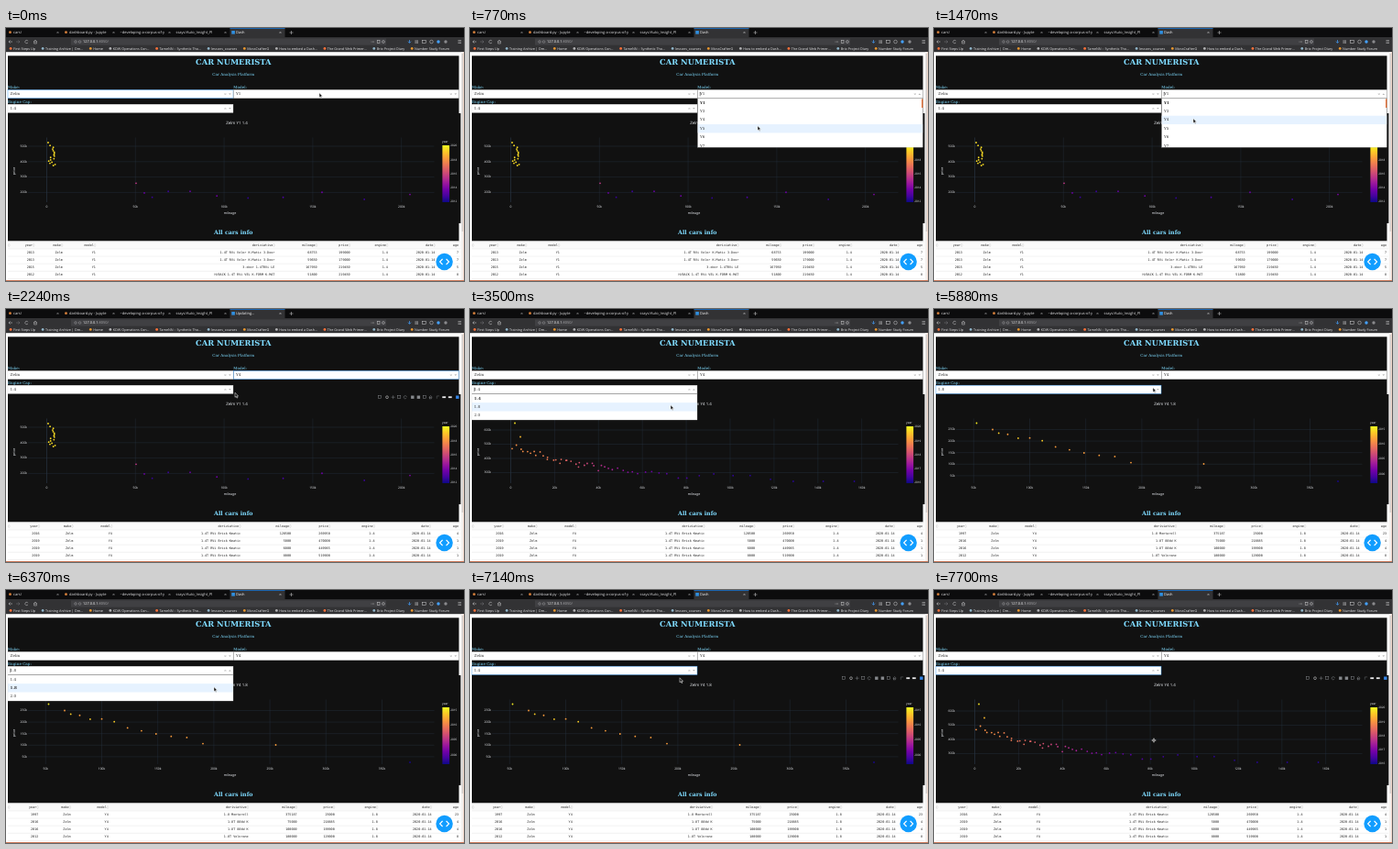
An HTML page with a canvas for the animation above (8000 ms loop, 500 px wide and 276 px high).

```html
<!DOCTYPE html>
<html lang="en">
<head>
<meta charset="utf-8">
<title>Car dashboard</title>
<style>
html, body { margin: 0; width: 100%; height: 100%; overflow: hidden; background: #fff; }
canvas { display: block; width: 500px; height: 276px; }
</style>
</head>
<body>
<canvas id="stage"></canvas>
<script>
const W = 500, H = 276, LOOP = 8000;
const canvas = document.getElementById('stage');
const scale = window.devicePixelRatio || 1;
canvas.width = W * scale;
canvas.height = H * scale;
const ctx = canvas.getContext('2d');

const SERIF = '"DejaVu Serif", serif', SANS = '"Open Sans", sans-serif';
const MONO = '"DejaVu Sans Mono", monospace';
const CYAN = '#7fdbff', DARK = '#111111', GRID = '#283442', PALE = '#f2f5fa', ICON = '#d0d0d2';
const PLASMA = ['#0d0887', '#46039f', '#7201a8', '#9c179e', '#bd3786',
  '#d8576b', '#ed7953', '#fb9f3a', '#fdca26', '#f0f921'];
const MAKE = 'Zelm';

// Drawing helpers
function rect(x, y, w, h, color) {
  ctx.fillStyle = color;
  ctx.fillRect(x, y, w, h);
}

function box(x, y, w, h, color, width = 0.5) {
  ctx.strokeStyle = color;
  ctx.lineWidth = width;
  ctx.strokeRect(x, y, w, h);
}

function line(points, color, width = 0.5) {
  ctx.beginPath();
  for (let i = 0; i < points.length; i += 2) ctx.lineTo(points[i], points[i + 1]);
  ctx.strokeStyle = color;
  ctx.lineWidth = width;
  ctx.stroke();
}

function chevron(x, y, dx, dy, color, width) {
  // Points along (dx, dy)
  line([x - dx - dy, y - dy - dx, x, y, x - dx + dy, y - dy + dx], color, width);
}

function dot(x, y, r, color) {
  ctx.beginPath();
  ctx.arc(x, y, r, 0, Math.PI * 2);
  ctx.fillStyle = color;
  ctx.fill();
}

function ring(x, y, r, color, from = 0, to = Math.PI * 2) {
  ctx.beginPath();
  ctx.arc(x, y, r, from, to);
  ctx.strokeStyle = color;
  ctx.lineWidth = 0.5;
  ctx.stroke();
}

function setFont(size, family, weight = '') {
  ctx.font = `${weight} ${size}px ${family}`;
}

function text(str, x, y, size, family, color, align = 'left', weight = '') {
  setFont(size, family, weight);
  ctx.textAlign = align;
  ctx.fillStyle = color;
  ctx.fillText(str, x, y);
}

function cross(x, y, r, color) {
  line([x - r, y - r, x + r, y + r], color, 0.45);
  line([x + r, y - r, x - r, y + r], color, 0.45);
}

function seeded(seed) {
  return () => {
    seed = (seed * 16807) % 2147483647;
    return seed / 2147483647;
  };
}

// Each point is [x, y, position on the colour scale]
function smallCars() {
  const rnd = seeded(41), pts = [[142, 169.3, 0.45]];
  for (let i = 0; i < 17; i++) {
    const u = i / 16;
    pts.push([46 + rnd() * (5 + 6 * u), 125 + 25 * u ** 0.75, 0.93]);
  }
  for (let i = 0; i < 10; i++) pts.push([151 + 290 * (i / 9) ** 1.6, 182 + (rnd() - 0.5) * 11, 0.06 + rnd() * 0.2]);
  return pts;
}

function midCars() {
  const rnd = seeded(7), pts = [[49, 124.5, 0.95], [55, 139.5, 0.85]];
  for (let i = 0; i < 50; i++) {
    const u = i / 49, x = 46 + 170 * u + 200 * u ** 8 + rnd() * 4;
    const y = 187 - 38 * Math.exp((46 - x) / 95) + (rnd() - 0.5) * 8;
    pts.push([x, Math.min(y, 188), 0.05 + 0.68 * Math.exp(-(((x - 46) / 125) ** 2))]);
  }
  return pts;
}

function largeCars() {
  const rnd = seeded(19), pts = [[46.5, 124.5, 0.97], [294.5, 169, 0.77], [441, 188, 0.02]];
  for (let i = 0; i < 12; i++) {
    const x = 64 + 151 * (i / 11) ** 1.3;
    pts.push([x, 134 + 0.21 * (x - 64) + (rnd() - 0.5) * 5, i % 2 && i < 6 ? 0.9 : 0.77]);
  }
  return pts;
}

// Axes: first tick position, spacing, first value, value step, count
const axis = (at, step, from, by, n) => ({ at, step, from, by, n });

const PLOTS = {
  small: {
    title: MAKE + ' Y1 1.4', points: smallCars(),
    xs: axis(44.5, 96.8, 0, 50, 5), ys: axis(129, 16.8, 500, -100, 4), bar: axis(128.5, 15.2, 2020, -2, 5)
  },
  mid: {
    title: MAKE + ' Y4 1.4', points: midCars(),
    xs: axis(44.5, 47.9, 0, 20, 9), ys: axis(132, 15.5, 600, -100, 4), bar: axis(128.5, 15.2, 2020, -1, 5)
  },
  large: {
    title: MAKE + ' Y4 1.8', points: largeCars(),
    xs: axis(43.3, 61.2, 50, 50, 7), ys: axis(131.5, 12.6, 250, -50, 5), bar: axis(131, 16.3, 2015, -5, 4)
  }
};

const HEADS = ['year', 'make', 'model', 'deriviative', 'mileage', 'price', 'engine', 'date', 'age'];

// chars: width of the longest derivative, which sets how the columns share the row
const TABLES = {
  small: { model: 'Y1', engine: '1.4', chars: 38, rows: [
    '2013|1.4T RVi Velor K-Matic 3-Door|68753|199000',
    '2013|1.4T RVi Velor K-Matic 3-Door|59650|179000',
    '2015|3-door 1.4TRVi LE|167950|219450',
    '2012|H/BACK 1.4T RVi VEL K-FORM K-MAT|51800|219450'] },
  mid: { model: 'Y4', engine: '1.4', chars: 23, rows: [
    '2016|1.4T RVi Brisk Kmatic|120500|269950',
    '2019|1.4T RVi Brisk Kmatic|5000|470000',
    '2019|1.4T RVi Brisk Kmatic|6000|449985',
    '2019|1.4T RVi Brisk Kmatic|8000|519900'] },
  large: { model: 'Y4', engine: '1.8', chars: 26, rows: [
    '1997|1.8 Montarell|375187|25000',
    '2016|1.8T 88kW K|75000|218885',
    '2016|1.8T 88kW K|100000|199900',
    '2012|1.8T Velorane|180000|129000'] }
};

const TABS = ['cars/', 'dashboard.py - Jupyte', '~developing-a-corpus-of-y', 'ssays/Auto_Insight_Pl'];
const BOOKMARKS = ['First Steps Up', 'Training Archive | Om…', 'Home', 'KDW Operations Con…',
  'TameNN – Synthetic Tho…', 'lessons_courses', 'MossCrafterG', 'How to embed a Dash…',
  'The Grand Web Primer…', 'Brio Project Diary', 'Number Study Forum'];
const BOOKMARK_DOTS = ['#ff7139', '#8fb4c8', '#e8962e', '#b1b1b3'];

// What the page does, and when
const EVENTS = [
  [0, { focus: 'make', menu: '', model: 'Y1', engine: '1.4', table: 'small', plot: 'small', updating: false }],
  [210, { focus: 'model', menu: 'model' }],
  [1680, { menu: '', model: 'Y4' }],
  [1750, { updating: true }],
  [1960, { table: 'mid' }],
  [2380, { plot: 'mid', updating: false }],
  [2660, { focus: 'engine', menu: 'engine' }],
  [3920, { menu: '', engine: '1.8' }],
  [3990, { updating: true }],
  [4060, { table: 'large' }],
  [4270, { plot: 'large', updating: false }],
  [5950, { menu: 'engine' }],
  [7140, { menu: '', engine: '1.4' }],
  [7210, { updating: true }],
  [7280, { table: 'mid' }],
  [7490, { plot: 'mid', updating: false }]
];

// Pointer moves: start, end, target x, y
const MOVES = [[420, 770, 315, 109], [770, 1470, 284, 101], [1680, 2240, 251, 93.5],
  [2240, 2520, 226, 89], [3010, 3500, 220, 107], [3920, 4340, 225, 117], [4550, 5180, 241, 140],
  [5530, 5880, 240, 88], [5950, 6300, 228, 108], [6370, 6860, 230, 98], [7140, 7700, 240, 164]];

function pointer(t) {
  let x = 343, y = 73;
  for (const [from, to, tx, ty] of MOVES) {
    const k = Math.min(1, Math.max(0, (t - from) / (to - from)));
    const ease = k * k * (3 - 2 * k);
    x += (tx - x) * ease;
    y += (ty - y) * ease;
  }
  return { x, y };
}

function stateAt(t) {
  const past = EVENTS.filter(([at]) => at <= t).map(([, change]) => change);
  return Object.assign(pointer(t), ...past);
}

function drawTabs(updating) {
  rect(0, 0, W, 10, '#0c0c0d');
  rect(0, 10, W, 16.2, '#323234');
  rect(244.5, 0, 60, 10, '#323234');
  rect(244.5, 0, 60, 0.6, '#0a84ff');
  TABS.forEach((name, i) => {
    const x = i * 61, shift = i < 2 ? 8 : 2.5;
    if (i < 2) dot(x + 4.5, 4.7, 1.4, '#d8813c');
    text(name, x + shift, 4.9, 4, SANS, '#e2e2e4');
    cross(x + 56.5, 4.9, 0.9, '#c8c8ca');
  });
  rect(246.3, 3, 3.6, 3.6, '#2f8fe0');
  text(updating ? 'Updating...' : 'Dash', 251, 4.9, 4, SANS, '#f9f9fa');
  cross(299.5, 4.9, 0.9, '#e2e2e4');
  line([309.5, 5, 313.5, 5], ICON);
  line([311.5, 3, 311.5, 7], ICON);
}

function drawToolbar() {
  const y = 15;
  line([3, y, 7, y], ICON);
  chevron(3, y, -1.6, 0, ICON);
  line([11, y, 15, y], '#77777a');
  chevron(15, y, 1.6, 0, '#77777a');
  ring(22.5, y, 1.7, ICON, 0.5, 5.8);
  chevron(32, y - 2, 0, -2, ICON);
  box(30.8, y, 2.4, 2, ICON);
  rect(71, 11.4, 344, 7.2, '#404043');
  ring(76, y, 1.3, '#a0a0a4');
  ring(80.6, y, 1.3, '#a0a0a4');
  text('127.0.0.1', 84, y + 0.1, 3.9, SANS, '#f9f9fa');
  text(':8050/', 84 + ctx.measureText('127.0.0.1').width, y + 0.1, 3.9, SANS, '#a8a8ab');
  for (let i = 0; i < 3; i++) {
    dot(399 + i * 1.4, y, 0.4, ICON);
    line([447 + i * 1.2, 13.2, 447 + i * 1.2, 17], ICON);
    line([493.5, 13.5 + i * 1.5, 497, 13.5 + i * 1.5], ICON);
  }
  box(405.2, 13.6, 2.8, 2.8, ICON);
  ring(412, y, 1.4, ICON);
  line([440.5, 13, 440.5, 16.3], '#45a1ff', 0.7);
  chevron(440.5, 16.3, 0, 1.6, '#45a1ff', 0.7);
  box(454.5, 13.3, 4, 3.4, ICON);
  ring(464.5, y, 1.8, ICON);
  dot(472, y, 1.7, '#45a1ff');
  dot(480, y, 1.7, '#8a8a8d');
}

function drawBookmarks() {
  setFont(3.75, SANS);
  const widths = BOOKMARKS.map(name => ctx.measureText(name).width);
  const gap = (476 - widths.reduce((a, b) => a + b)) / (widths.length - 1);
  let x = 8;
  BOOKMARKS.forEach((name, i) => {
    dot(x - 2.9, 22.4, 1.4, BOOKMARK_DOTS[i % BOOKMARK_DOTS.length]);
    text(name, x, 22.6, 3.75, SANS, '#e6e6e8');
    x += widths[i] + gap;
  });
}

function drawSelect(x, y, value, focused, open) {
  const w = 246, ax = x + w - 3.6, ay = y + 4.7, d = open ? -0.7 : 0.7;
  rect(x, y, w, 9.2, '#fff');
  box(x, y, w, 9.2, focused && !open ? '#4aa3f5' : '#cccccc', focused && !open ? 0.5 : 0.3);
  text(value, x + 2.6, ay, 4.17, SERIF, '#333');
  if (open) line([x + 2.8, y + 2.4, x + 2.8, y + 7], '#222');
  cross(x + w - 8.6, ay, 0.9, '#999');
  ctx.beginPath();
  ctx.moveTo(ax - 1.3, ay - d);
  ctx.lineTo(ax + 1.3, ay - d);
  ctx.lineTo(ax, ay + d);
  ctx.fillStyle = '#999';
  ctx.fill();
}

function drawMenu(x, y, h, options, current, py) {
  const w = 246, row = 9.35;
  const hover = py < y ? options.indexOf(current) : Math.floor((py - y) / row);
  ctx.save();
  ctx.beginPath();
  ctx.rect(x, y, w, h);
  ctx.clip();
  rect(x, y, w, h, '#fff');
  options.forEach((name, i) => {
    const top = y + i * row;
    if (i === hover) rect(x, top, w, row, '#e6f2ff');
    text(name, x + 2.6, top + row / 2, 4.17, SERIF, '#333', 'left', name === current ? 'bold' : '');
  });
  ctx.restore();
  box(x, y, w, h, '#cccccc', 0.3);
}

function drawHeader(s) {
  rect(2, 30.3, 492.5, 63.7, DARK);
  text('CAR NUMERISTA', 248.3, 38, 8.33, SERIF, CYAN, 'center', 'bold');
  text('Car Analysis Platform', 248.3, 50.7, 4.17, SERIF, CYAN, 'center');
  text('Make:', 2, 64.7, 4.17, SERIF, CYAN);
  text('Model:', 248.3, 64.7, 4.17, SERIF, CYAN);
  text('Engine Cap:', 2, 80.6, 4.17, SERIF, CYAN);
  drawSelect(2, 67.4, MAKE, s.focus === 'make', false);
  drawSelect(248.4, 67.4, s.model, s.focus === 'model', s.menu === 'model');
  drawSelect(2, 83.2, s.engine, s.focus === 'engine', s.menu === 'engine');
}

function ticks(a, draw) {
  for (let i = 0; i < a.n; i++) draw(a.at + a.step * i, a.from + a.by * i);
}

function plasma(t) {
  const p = t * (PLASMA.length - 1), i = Math.min(PLASMA.length - 2, Math.floor(p)), k = p - i;
  const part = (c, j) => parseInt(PLASMA[c].slice(1 + j * 2, 3 + j * 2), 16);
  const mix = [0, 1, 2].map(j => Math.round(part(i, j) * (1 - k) + part(i + 1, j) * k));
  return `rgb(${mix})`;
}

function drawPlot(p) {
  rect(2, 93, 494.5, 120, DARK);
  rect(2, 213, 492.5, 19.5, DARK);
  text(p.title, 252, 104.3, 4.43, SANS, PALE, 'center');
  ticks(p.xs, (x, v) => {
    line([x, 119.5, x, 190], GRID, v ? 0.4 : 0.7);
    text(v ? v + 'k' : '0', x, 195, 3.3, SANS, PALE, 'center');
  });
  ticks(p.ys, (y, v) => {
    line([24, y, 467.5, y], GRID, 0.4);
    text(v + 'k', 23, y, 3.3, SANS, PALE, 'right');
  });
  text('mileage', 244.5, 202.4, 3.7, SANS, PALE, 'center');
  ctx.save();
  ctx.translate(8.7, 156);
  ctx.rotate(-Math.PI / 2);
  text('price', 0, 0, 3.7, SANS, PALE, 'center');
  ctx.restore();
  for (const [x, y, t] of p.points) dot(x, y, 0.9, plasma(t));
  const fill = ctx.createLinearGradient(0, 190, 0, 128);
  PLASMA.forEach((c, i) => fill.addColorStop(i / (PLASMA.length - 1), c));
  rect(476.4, 128, 7.7, 62, fill);
  text('year', 476, 124.6, 3.3, SANS, PALE);
  ticks(p.bar, (y, v) => text(v, 485.2, y, 3.1, SANS, PALE));
}

// Modebar icons, in groups, each drawn around its centre
const frame = (x, y, c) => box(x - 1.6, y - 1.5, 3.2, 3, c);
const block = (x, y, c) => rect(x - 1.7, y - 1.7, 3.4, 3.4, c);
const lens = (x, y) => ring(x, y, 1.4, '#e8e8ea');
const loop = (x, y, c) => ring(x, y, 1.6, c, 0.8, 6.3);
const house = (x, y, c) => { chevron(x, y - 1.7, 0, -1.8, c); box(x - 1, y, 2, 1.7, c); };
const plus = (x, y, c) => { line([x - 2, y, x + 2, y], c); line([x, y - 2, x, y + 2], c); };
const label = (x, y) => rect(x - 1.9, y - 0.9, 3.8, 1.8, '#e8e8ea');
const mark = (x, y) => block(x, y, '#3585e8');
const MODEBAR = [[frame], [lens, plus, frame, loop], [block, block, frame, house],
  [chevronIcon, label, label], [mark]];

function chevronIcon(x, y, c) {
  line([x - 1.3, y + 1.6, x - 1.3, y - 1.3, x + 1.5, y - 1.3], c, 0.4);
}

function drawModebar() {
  let x = 408;
  for (const group of MODEBAR) {
    for (const icon of group) {
      icon(x, 96.2, '#85888c');
      x += 6.6;
    }
    x += 1.4;
  }
}

function sortIcon(x) {
  line([x - 0.8, 236.6, x, 235.6, x + 0.8, 236.6], '#888', 0.3);
  line([x - 0.8, 237.4, x, 238.4, x + 0.8, 237.4], '#888', 0.3);
}

function drawTable({ model, engine, chars, rows }) {
  text('All cars info', 248.3, 223.6, 6.25, SERIF, CYAN, 'center', 'bold');
  rect(2, 232.6, 494.5, 8.5, '#fafafa');
  for (let i = 0; i < 6; i++) line([2, 232.9 + i * 8.1, 496, 232.9 + i * 8.1], '#d3d3d3', 0.3);

  const widths = HEADS.map(h => h === 'deriviative' ? chars : Math.max(h.length + 2, h === 'date' ? 10 : 0));
  const unit = 494 / widths.reduce((a, b) => a + b);
  const cells = rows.map(row => {
    const [year, kind, miles, price] = row.split('|');
    return [year, MAKE, model, kind, miles, price, engine, '2020-01-14', 2020 - year];
  });
  let x = 0;
  sortIcon(3.2);
  HEADS.forEach((head, i) => {
    x += widths[i] * unit;
    const last = i === HEADS.length - 1;
    text(head, last ? x : x - 2, 237, 3.43, MONO, '#222', 'right');
    if (!last) sortIcon(x - 0.7);
    cells.forEach((row, j) => text(row[i], x, 245.1 + j * 8.05, 3.43, MONO, '#222', 'right'));
  });
}

function drawButton() {
  dot(478.6, 255, 9.2, '#119dff');
  chevron(473.6, 255, -3, 0, '#fff', 1.1);
  chevron(483.6, 255, 3, 0, '#fff', 1.1);
}

function drawPointer({ x, y, menu }) {
  if (!menu && y > 119.5 && y < 190) {
    for (const [color, w] of [['#fff', 1.3], ['#111', 0.5]]) {
      line([x - 2.2, y, x + 2.2, y], color, w);
      line([x, y - 2.2, x, y + 2.2], color, w);
    }
    return;
  }
  ctx.beginPath();
  [[0, 0], [0, 5], [1.2, 3.9], [2, 5.8], [2.9, 5.4], [2, 3.7], [3.6, 3.6]]
    .forEach(([dx, dy]) => ctx.lineTo(x - 1 + dx, y - 2.2 + dy));
  ctx.closePath();
  ctx.fillStyle = '#111';
  ctx.fill();
  ctx.strokeStyle = '#fff';
  ctx.lineWidth = 0.5;
  ctx.stroke();
}

function drawEdges() {
  rect(496.8, 26.2, 3.2, 249, '#f4f1ef');
  rect(497.6, 28, 1.6, 194, '#d4d0ce');
  rect(499.4, 26.2, 0.6, 249, '#f1c9b4');
  rect(0, 275.1, W, 0.9, '#c96f4c');
}

function render(t) {
  const s = stateAt(t);
  ctx.setTransform(scale, 0, 0, scale, 0, 0);
  ctx.textBaseline = 'middle';
  ctx.textRendering = 'geometricPrecision';
  rect(0, 0, W, H, '#fff');
  drawTabs(s.updating);
  drawToolbar();
  drawBookmarks();
  drawPlot(PLOTS[s.plot]);
  if (!s.menu && s.y > 93) drawModebar();
  drawHeader(s);
  drawTable(TABLES[s.table]);
  drawEdges();
  if (s.menu === 'model') {
    drawMenu(248.4, 77, 53.2, ['Y1', 'Y3', 'Y4', 'Y5', 'Y6', 'Y7'], s.model, s.y);
    rect(493, 77.4, 1.4, 9.6, '#e8743b');
  }
  if (s.menu === 'engine') drawMenu(2, 92.8, 28.2, ['1.4', '1.8', '2.0'], s.engine, s.y);
  drawButton();
  drawPointer(s);
}

const start = performance.now();
function tick() {
  render((performance.now() - start) % LOOP);
  requestAnimationFrame(tick);
}
tick();
</script>
</body>
</html>
```
